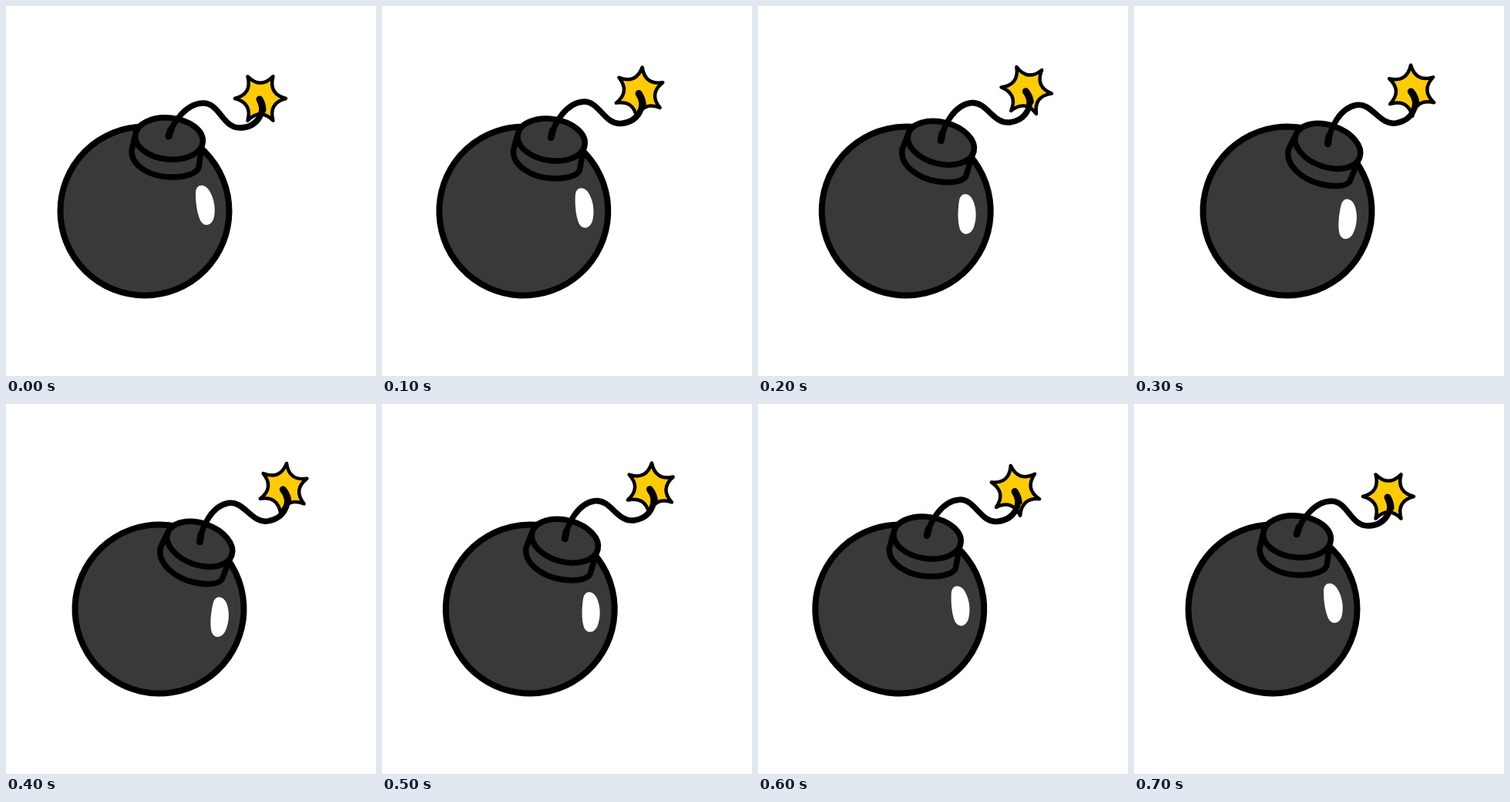
Recreate the animation shown at these times as an HTML page with a canvas. Size 480 by 480 pixels, loop 750 ms.

```html
<!DOCTYPE html>
<html>
<head>
<meta charset="utf-8">
<title>Bomb</title>
<style>
  html, body { margin: 0; width: 100%; height: 100%; overflow: hidden; background: #fff; }
  canvas { display: block; }
</style>
</head>
<body>
<canvas id="stage" width="480" height="480"></canvas>
<script>
const ctx = document.getElementById('stage').getContext('2d');
const LOOP = 750, STEP = 50, SWING = 700;
const GREY = '#393939', YELLOW = '#ffcb05';

// Shapes relative to the ball centre, fuse relative to its root
const capSide = new Path2D('M-13 -96L-17 -78C-17 -57 10 -44 34 -44C54 -44 67 -49 70 -56L74 -84Z');
const shine = new Path2D('M66 -23C66 -36 78 -36 84 -26C90 -16 92 -4 90 7C88 19 77 22 72 12C68 3 66 -10 66 -23Z');
const fuse = new Path2D('M0 0C6 -20 24 -43 45 -43S70 -11 92 -11S127 -30 118 -48');
const fuseEnds = new Path2D('M0 0L3 -9M118 -48Q122 -41 122 -34');
const ball = ellipse(0, 0, 109.5, 109.5);
const capTop = ellipse(31.5, -94, 44, 27, rad(6));
const spark = star(6, 33);
const ROOT = [31, -97], SPARK = [119, -49];

function rad(deg) {
  return deg * Math.PI / 180;
}

function ellipse(x, y, rx, ry, tilt = 0) {
  const path = new Path2D();
  path.ellipse(x, y, rx, ry, tilt, 0, 2 * Math.PI);
  return path;
}

// Star with sharp tips and hollow sides
function star(tips, radius) {
  const path = new Path2D();
  const point = (turn, r) => {
    const a = 2 * Math.PI * turn / tips;
    return [r * Math.cos(a), r * Math.sin(a)];
  };
  path.moveTo(radius, 0);
  for (let n = 1; n <= tips; n++) {
    path.quadraticCurveTo(...point(n - 0.5, radius * 0.36), ...point(n, radius));
  }
  path.closePath();
  return path;
}

function rotate([x, y], a) {
  const c = Math.cos(a), s = Math.sin(a);
  return [x * c - y * s, x * s + y * c];
}

function line(path, width) {
  ctx.lineWidth = width;
  ctx.stroke(path);
}

function paint(path, fill, width) {
  ctx.fillStyle = fill;
  ctx.fill(path);
  if (width) line(path, width);
}

function draw(t) {
  const sway = Math.sin(Math.PI * t / SWING);
  const swing = sway * sway;
  const tilt = rad(14 * swing), bend = rad(-10.3 * sway);
  // One tip further per swing, plus a swirl that dies out again
  const spin = rad(60 * t / SWING + 64 * sway);

  ctx.setTransform(1, 0, 0, 1, 0, 0);
  ctx.fillStyle = '#fff';
  ctx.fillRect(0, 0, 480, 480);
  ctx.strokeStyle = '#000';
  ctx.lineCap = ctx.lineJoin = 'round';

  ctx.translate(180 + 20 * swing, 266);
  ctx.save();
  ctx.rotate(tilt);
  paint(ball, GREY, 8);
  paint(shine, '#fff');
  paint(capSide, GREY, 7.5);
  paint(capTop, GREY, 7.5);
  ctx.restore();

  ctx.translate(...rotate(ROOT, tilt));
  ctx.save();
  ctx.translate(...rotate(SPARK, bend));
  ctx.rotate(spin);
  paint(spark, YELLOW, 4.5);
  ctx.restore();

  ctx.rotate(bend);
  line(fuse, 7.5);
  line(fuseEnds, 9);
}

function tick() {
  draw(Math.floor(performance.now() % LOOP / STEP) * STEP);
  requestAnimationFrame(tick);
}
tick();
</script>
</body>
</html>
```
